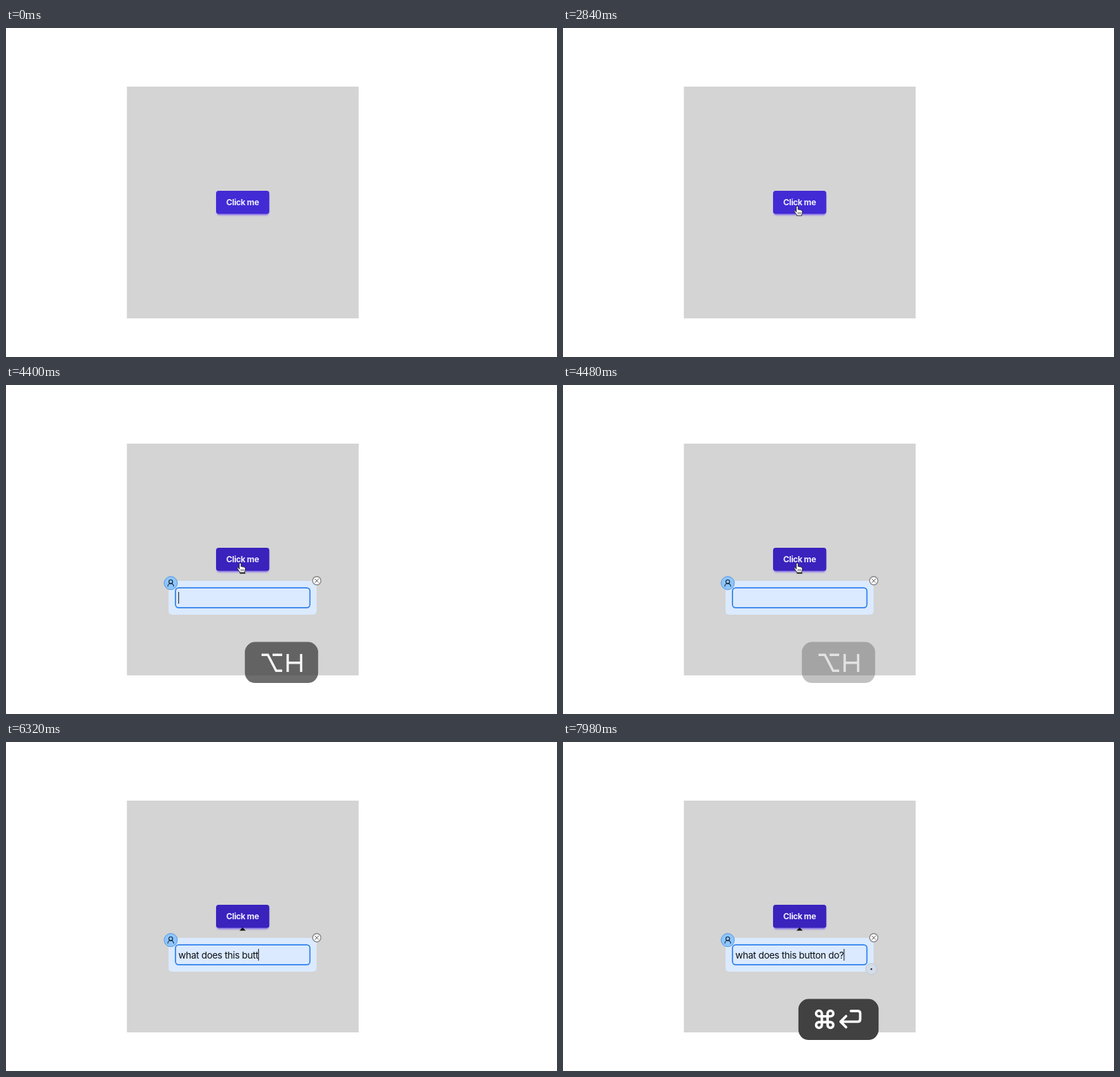
Write an HTML page that moves like this. It is 800 px wide and 477 px high and loops after 8 s.

```html
<!DOCTYPE html>
<html lang="en">
<head>
<meta charset="utf-8">
<title>Ask about a button</title>
<style>
  html, body { margin: 0; width: 100%; height: 100%; overflow: hidden; background: #fff; }
  svg { display: block; width: 800px; height: 477px; }
  text { font-family: Inter, sans-serif; white-space: pre; }
  .label { font-size: 12px; font-weight: 700; letter-spacing: -.35px; fill: #eceeff; text-anchor: middle; }
  #typed { font-size: 13.6px; letter-spacing: -.34px; fill: #0b0e14; }
  .glyph { fill: none; stroke: #fff; }
  .panel { fill: #414141; }
  .line { fill: none; stroke-linecap: round; stroke-linejoin: round; }
</style>
</head>
<body>
<svg viewBox="0 0 800 477">
  <defs>
    <filter id="soft"><feGaussianBlur stdDeviation=".9"/></filter>
    <path id="route" d="M14 303Q190 312 326 274C380 250 425 205 408 198S355 215 340 258"/>
    <path id="option" d="M371 391.3h9.2l12 23H401M387 391.3h14" stroke-width="3.4"/>
    <path id="command" transform="translate(363.3 385.3) scale(1.39)" stroke-width="2.6"
      d="M15 6v12a3 3 0 1 0 3-3H6a3 3 0 1 0 3 3V6a3 3 0 1 0-3 3h12a3 3 0 1 0-3-3"/>
  </defs>

  <rect x="175.5" y="85" width="336.5" height="336" fill="#d4d4d4"/>
  <rect x="306" y="240" width="75.5" height="31.5" rx="4" fill="#7a5cf0" opacity=".75" filter="url(#soft)"/>
  <rect id="button" x="305" y="236" width="77.3" height="33.5" rx="3.8" fill="#422ad5"/>
  <text class="label" x="343.5" y="257.4">Click me</text>

  <g id="popup">
    <path d="M339 273.6l4.5-4.8 4.5 4.8z" fill="#101010"/>
    <rect x="236" y="284" width="215" height="49" rx="5" fill="#dbeafe"/>
    <rect x="246.1" y="294.1" width="195.2" height="28.8" rx="4.6" fill="#dbeafe" stroke="#2f80ed" stroke-width="1.7"/>

    <circle cx="239.2" cy="287.2" r="9.6" fill="#8ec5ff" stroke="#4d94dd" stroke-width=".9"/>
    <g class="line" stroke="#10202f" stroke-width="1.1">
      <circle cx="239.2" cy="285.2" r="2.7"/>
      <path d="M235 291.8a4.2 4 0 0 1 8.4 0"/>
    </g>

    <circle cx="451.2" cy="283.8" r="6" fill="#fff" stroke="#858585" stroke-width="1.4"/>
    <path class="line" d="M448.7 281.3l5 5m0-5l-5 5" stroke="#555"/>

    <g id="send">
      <circle id="disc" cx="449.7" cy="331" r="8.4" fill="#c1c2c5"/>
      <path class="line" d="M445.9 327.2l8.6 3.8-8.6 3.8 1.4-3.8zM447.3 331h7" stroke="#fff" stroke-width="1.1"/>
    </g>
    <g id="busy">
      <circle cx="447.7" cy="329.2" r="8.2" fill="#d3dce8" stroke="#b9c0ca" stroke-width=".8"/>
      <circle cx="447.7" cy="329.2" r="1.2" fill="#20262e"/>
    </g>

    <text id="typed" x="250.3" y="313.9"></text>
    <rect id="caret" x="250.2" y="300" width="1" height="17" fill="#111"/>
  </g>

  <g id="pointer">
    <path id="arrow" d="M.3 0v13l3-2.8 2.3 4.8 2.2-1-2.2-4.6h4.1z" stroke="#fff" stroke-width="1.3" paint-order="stroke"/>
    <g id="hand" class="line" stroke="#111" stroke-width=".9">
      <path fill="#fff" d="M-1.3 8.5V1.2a1.3 1.3 0 0 1 2.6 0v4q2.2-.6 2.4.6 2-.6 2.3.7 1.6-.3 1.6 1.3V10q0 1.5-1 2.6V14H-.6v-1.2Q-2.5 11-4 8.2c-.8-1.5 1-2.3 1.9-.9z"/>
      <path d="M1.3 9.3v2.2m2-2.2v2.2m2-2.2v2.2" stroke-width=".7"/>
    </g>
  </g>

  <g id="alt">
    <rect class="panel" x="360" y="372.5" width="80" height="59.6" rx="15"/>
    <use href="#option" class="glyph" x="14"/>
  </g>
  <g id="altH">
    <rect class="panel" x="346.8" y="372.5" width="106.4" height="59.6" rx="15"/>
    <use href="#option" class="glyph"/>
    <path class="glyph" d="M409 390v26M428.5 390v26M409 402.7h19.5" stroke-width="3.4"/>
  </g>
  <g id="cmd">
    <rect class="panel" x="360" y="372.5" width="80" height="59.6" rx="15"/>
    <use href="#command" class="glyph" x="20"/>
  </g>
  <g id="cmdEnter">
    <rect class="panel" x="341.8" y="372.5" width="116.4" height="59.6" rx="15"/>
    <use href="#command" class="glyph"/>
    <path class="glyph line" d="M418 390h10q3.500 0 3.500 3.500v8.500q0 3.500-3.500 3.500H403M411 397.500l-8 8 8 8" stroke-width="3.6"/>
  </g>
</svg>
<script>
  const LOOP = 8000;
  const $ = id => document.getElementById(id);

  // points: [time in ms, value]; values hold until the next point unless eased
  function play(el, prop, points, easing = 'steps(1)') {
    const frames = points.map(([t, value]) => ({ [prop]: value, offset: t / LOOP, easing }));
    frames.push({ [prop]: points[points.length - 1][1], offset: 1 });
    el.animate(frames, { duration: LOOP, iterations: Infinity });
  }

  // spans: [from, to]; without an end it stays until the loop restarts
  function show(id, ...spans) {
    const points = spans.flatMap(([from, to]) => to ? [[from, 1], [to, 0]] : [[from, 1]]);
    play($(id), 'opacity', [[0, 0], ...points]);
  }

  // Pointer decelerates along its route
  const START = 1540, REST = 2200;
  const route = $('route'), length = route.getTotalLength();
  const path = [];
  for (let t = START; t <= REST; t += 20) {
    const done = 1 - (1 - (t - START) / (REST - START)) ** 1.94;
    const { x, y } = route.getPointAtLength(done * length);
    path.push([t, `translate(${x}px, ${y}px)`]);
  }
  play($('pointer'), 'transform', [[0, path[0][1]], ...path], 'linear');
  show('arrow', [START, 2150]);
  show('hand', [2150, 4640]);

  // Shortcut panels
  show('alt', [3080, 3280]);
  play($('altH'), 'opacity', [[0, 0], [3279, 0], [3280, 1], [4360, 1], [4540, 0]], 'linear');
  show('cmd', [7580, 7780]);
  show('cmdEnter', [7780]);

  // Popup
  show('popup', [3280]);
  show('send', [0, 7880]);
  show('busy', [7880]);
  play($('button'), 'fill', [[0, '#422ad5'], [3310, '#422ad5'], [3400, '#3a22bd']], 'linear');
  play($('disc'), 'fill', [[0, '#c1c2c5'], [4640, '#c1c2c5'], [4840, '#2b7fff']], 'linear');
  show('caret', [3280, 3700], [4100, 4460], [4640, 7080], [7480]);

  // Typing in bursts, keys evenly spaced within each
  const bursts = [['what d', 4640, 5120], ['oes', 5200, 5330], [' this but', 5480, 6180],
                  ['ton ', 6320, 6580], ['do?', 6780, 6880]];
  const typed = $('typed');
  const keys = bursts.flatMap(([text, from, to]) =>
    [...text].map((ch, i) => [ch, from + (to - from) * i / (text.length - 1)]));
  for (const [ch, t] of keys) {
    const letter = document.createElementNS(typed.namespaceURI, 'tspan');
    letter.textContent = ch;
    typed.append(letter);
    play(letter, 'fillOpacity', [[0, 0], [t, 1]]);
  }
  const caretStops = keys.map(([, t], i) =>
    [t, `translateX(${typed.getSubStringLength(0, i + 1)}px)`]);
  play($('caret'), 'transform', [[0, 'translateX(0px)'], ...caretStops]);
</script>
</body>
</html>
```
